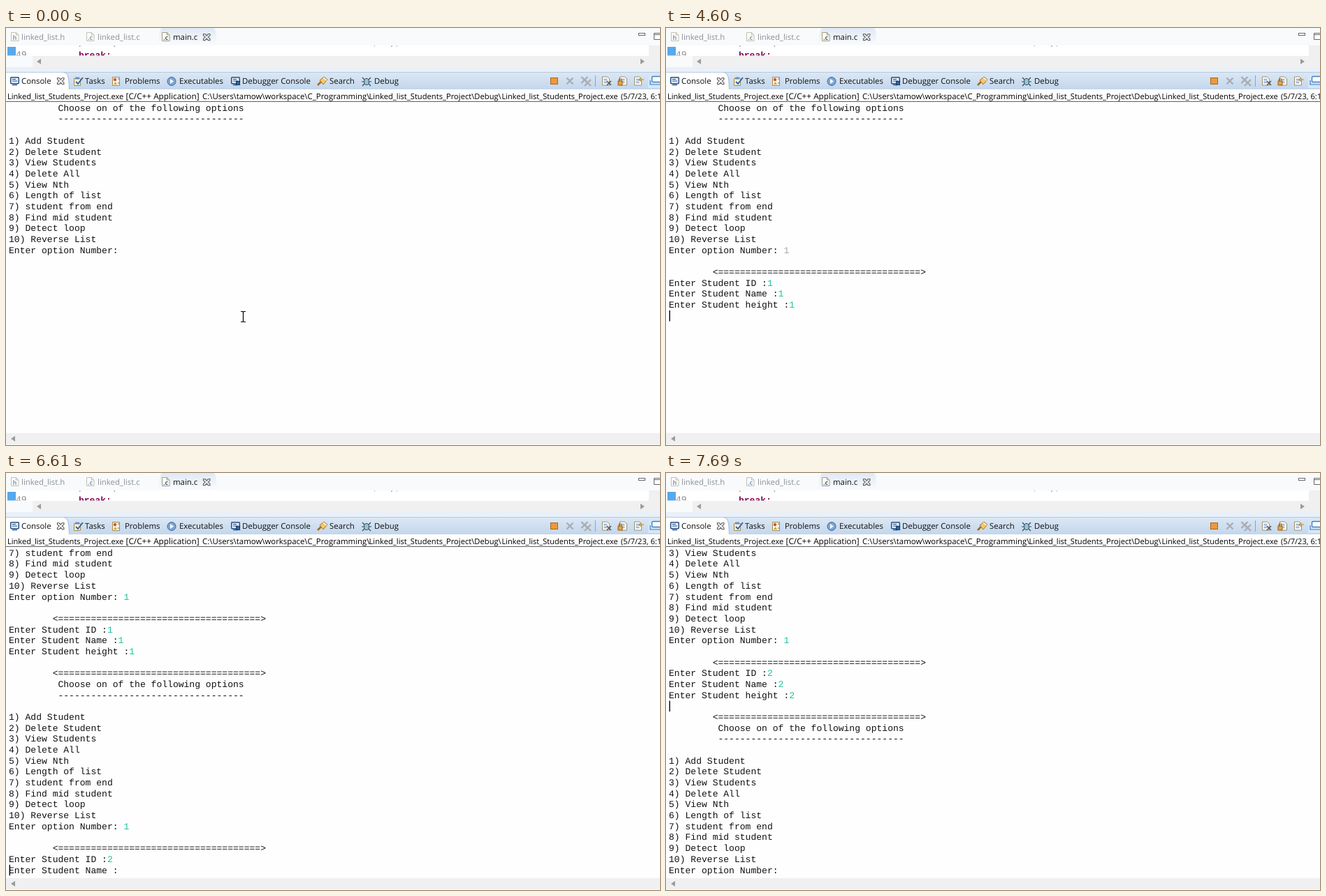
Write an HTML page that moves like this. It is 936 px wide and 598 px high and loops after 8000 ms.

```html
<!DOCTYPE html>
<html lang="en">
<head>
<meta charset="utf-8">
<title>Linked list console</title>
<style>
html, body { margin: 0; width: 100%; height: 100%; overflow: hidden; background: #fff; }
svg { display: block; width: 100vw; height: 100vh; }
text { white-space: pre; text-rendering: geometricPrecision; }
.ui { font: 11.4px "Open Sans", "Noto Sans", sans-serif; fill: #111; }
.dim { fill: #8d9196; }
.path { fill: #000; }
.mono { font: 13.05px "Liberation Mono", "Courier New", monospace; fill: #111; }
.code { font: bold 13px "Liberation Mono", monospace; }
.glyph { font: bold 9px "Open Sans", sans-serif; fill: #2c5f9e; }
.line { fill: none; stroke-width: 1.2; }
</style>
</head>
<body>
<svg viewBox="0 0 936 598" preserveAspectRatio="none">
  <defs>
    <linearGradient id="strip" x2="0" y2="1">
      <stop offset="0" stop-color="#dce8f5"/><stop offset="1" stop-color="#c2d6eb"/>
    </linearGradient>
    <linearGradient id="tab" x2="0" y2="1">
      <stop offset="0" stop-color="#dfe9f5"/><stop offset="1" stop-color="#fbfcfe"/>
    </linearGradient>
    <clipPath id="editor"><path d="M0 25.5H920V39.5H0z"/></clipPath>
    <clipPath id="view"><path d="M0 106H936V581H0z"/></clipPath>
    <g id="page">
      <path d="M.5.5h7l3.500 3.500v8.500H.5z" fill="#fdfdfb" stroke="#a79b78"/>
      <path d="M7.500.5v3.500h3.500" class="line" stroke="#a79b78"/>
    </g>
    <path id="close" class="line" d="M.5.5h2.500l2.200 2.500 2.200-2.500h2.500v2.200l-2.600 2.400 2.600 2.400v2.200h-2.500l-2.200-2.500-2.200 2.500H.5V7.500l2.600-2.400L.5 2.700z" stroke="#666"/>
    <path id="cross" class="line" d="M0 0l9 9M9 0L0 9" stroke="#a9adb2" style="stroke-width:2.4"/>
    <g id="sheet">
      <path d="M.5.5h7l3 3v9H.5z" fill="#fff" stroke="#9a8f68"/>
      <path d="M2.500 4h5M2.500 6.500h5M2.500 9h5" class="line" stroke="#5b80b5"/>
    </g>
    <g id="screen">
      <rect x=".7" y=".7" width="11.600" height="9" rx="1" fill="#e6f0fb" stroke="#264f86" stroke-width="1.500"/>
      <path d="M3 3.500h5M3 6h7M3 11.700h7" class="line" stroke="#264f86"/>
    </g>
  </defs>

  <!-- editor -->
  <rect width="936" height="64" fill="#f8fafc"/>
  <path d="M217 25.500C219 25 219 0 224 0H296C300 0 301 4 301 25.500z" fill="url(#tab)"/>
  <g opacity=".6">
    <use href="#page" x="7" y="6"/><text class="glyph" x="9.500" y="17">h</text>
    <use href="#page" x="115" y="6"/><text class="glyph" x="117" y="17">.c</text>
  </g>
  <use href="#page" x="223" y="6"/><text class="glyph" x="225" y="17">.c</text>
  <g class="ui">
    <text class="dim" x="22" y="17">linked_list.h</text>
    <text class="dim" x="131" y="17">linked_list.c</text>
    <text x="239" y="17">main.c</text>
  </g>
  <use href="#close" x="282" y="8"/>
  <g fill="#fff" stroke="#666">
    <rect x="905.500" y="7.500" width="9" height="3"/>
    <path d="M940 7.500H927.500V16.500H940M927.500 9.500H940"/>
  </g>
  <rect y="25" width="920" height="15" fill="#fff"/>
  <rect x="920" y="25" width="16" height="31" fill="#f0f0f0"/>
  <g clip-path="url(#editor)">
    <rect x="2" y="27" width="12" height="13" fill="#58a8ea"/>
    <text class="code" x="14" y="42" style="font-weight:400;fill:#8a8a8a">49</text>
    <text class="code" x="104" y="43" fill="#7f0055">break;</text>
    <text class="code" x="104" y="24" style="font-weight:400;fill:#555">p     (                                               ,  );</text>
  </g>
  <rect x="38" y="40" width="882" height="16" fill="#f0f0f0"/>
  <path d="M50 44v8l-6-4zM908 44v8l6-4z" fill="#9b9b9b"/>

  <!-- view tabs -->
  <rect y="56" width="936" height="7" fill="#e9f0f8"/>
  <rect y="63" width="936" height="26" fill="url(#strip)"/>
  <path d="M0 63.500H936" stroke="#b8c9dc"/>
  <path d="M0 89V64H82C88 64 90 68 90 89z" fill="#fff"/>
  <path d="M82 63.500C88 64 90.500 68 90.500 89" class="line" stroke="#b0c3d8"/>
  <rect y="88" width="936" height="510" fill="#fefefe"/>
  <use href="#screen" x="6" y="70"/>
  <use href="#close" x="73" y="71"/>
  <g id="tabs" class="ui"></g>
  <g>
    <path d="M97.500 72.500h9v10h-9z" fill="#f8f1d8" stroke="#a68a4a"/>
    <path d="M100 77l3 3 7-9" class="line" stroke="#3465a8" style="stroke-width:2"/>
    <path d="M99 70.500h6v3h-6z" fill="#6d8fc0"/>
    <path d="M152.500 70.500h10v12h-10z" fill="#fbf5e2" stroke="#a68a4a"/>
    <circle cx="156" cy="74" r="2.200" fill="#d1503c"/><path d="M154 81l2.500-4 2.500 4z" fill="#e0a020"/>
    <path d="M160 73h2M160 79h2" class="line" stroke="#3465a8"/>
    <circle cx="237" cy="76.500" r="6" fill="#7fa6d6" stroke="#3b659c"/>
    <path d="M235 73l5 3.500-5 3.500z" fill="#fff"/>
    <use href="#screen" x="322" y="70"/>
    <path d="M329 76l6 6M329 82l6-6" class="line" stroke="#16325c"/><circle cx="332" cy="79" r="2.600" fill="#2f6db0" stroke="#16325c"/>
    <path d="M446 82l5-5" class="line" stroke="#a56a1e" style="stroke-width:2.500"/>
    <path d="M449 75l6-5 5 4-6 7z" fill="#f5c66c" stroke="#a3732c"/>
    <path d="M454 71l5 4" class="line" stroke="#fff"/>
    <path d="M510 71l3 3M522 71l-3 3M509 77h14M510 83l3-3M522 83l-3-3" class="line" stroke="#2d4a5e"/>
    <ellipse cx="516" cy="77" rx="3.400" ry="4.600" fill="#9cc3cf" stroke="#2d4a5e"/>
  </g>
  <g>
    <rect x="779.500" y="71.500" width="10" height="9" fill="#ee9a3a" stroke="#a8641c"/>
    <use href="#cross" x="802.500" y="71.500"/>
    <use href="#cross" x="823.500" y="70"/><use href="#cross" x="828" y="74"/>
    <path d="M843.500 68V84" stroke="#8ea2b8"/>
    <use href="#sheet" x="853" y="69.500"/>
    <path d="M860 76l6 6M866 76l-6 6" class="line" stroke="#555" style="stroke-width:1.600"/>
    <use href="#sheet" x="878" y="69.500"/>
    <rect x="876" y="76" width="6" height="6" fill="#e8a33a" stroke="#94631c"/>
    <path d="M877.500 76v-3h3v3" class="line" stroke="#94631c"/>
    <use href="#sheet" x="899" y="69.500"/>
    <path d="M913 74h-6M909 71.500L906 74l3 2.500" class="line" stroke="#c08a24"/>
    <rect x="919" y="67" width="17" height="19" fill="#d5e7f9"/>
    <rect x="924.500" y="69.500" width="16" height="8" rx="1.500" fill="#fff" stroke="#3f7fc4" stroke-width="1.400"/>
    <path d="M922 75v6h14" class="line" stroke="#3f7fc4"/>
  </g>
  <g id="label" class="ui path"></g>
  <path d="M0 105.500H936" stroke="#606060"/>

  <g clip-path="url(#view)">
    <g id="roll">
      <g id="rows" class="mono"></g>
      <rect id="caret" width="1.400" height="15.500" fill="#000"/>
    </g>
  </g>
  <rect y="581" width="936" height="16" fill="#f0f0f0"/>
  <path d="M13 585v8l-6-4z" fill="#9b9b9b"/>

  <path id="beam" class="line" d="M-3.500-7.500h2.500l1 1 1-1h2.500M0-6.500v13M-3.500 7.500h2.500l1-1 1 1h2.500" stroke="#000"/>
  <path id="arrow" d="M.5.5v15l3.500-3.300 2.400 5.500 2.200-1-2.400-5.300h4.800z" fill="#fff" stroke="#000"/>
</svg>
<script>
const $ = id => document.getElementById(id);
const LOOP = 8000, X0 = 4, CHAR = 7.83, BASE = 118.8, ROW = 15.68, ROWS = 30;

function label(parent, str, x, y, style) {
  const el = document.createElementNS('http://www.w3.org/2000/svg', 'text');
  el.setAttribute('x', x);
  el.setAttribute('y', y);
  if (style) el.setAttribute('style', style);
  el.textContent = str;
  return $(parent).appendChild(el);
}

[['Console', 22], ['Tasks', 113], ['Problems', 170], ['Executables', 248],
 ['Debugger Console', 338], ['Search', 463], ['Debug', 527]]
  .forEach(([s, x]) => label('tabs', s, x, 80));

const project = 'Linked_list_Students_Project';
[[project + '.exe', 2, 11.1], ['[C/C++ Application]', 171.5, 11.8],
 ['C:\\Users\\tamow\\workspace\\C_Programming\\', 281, 11.4],
 [project + '\\Debug\\', 519.5, 11.2], [project + '.exe', 709.5, 11.1], ['(5/7/23, 6:15 PM)', 880, 11.1]]
  .forEach(([s, x, size]) => label('label', s, x, 102, `font-size:${size}px`));

// console contents
const pad = ' '.repeat(9);
const items = ['Add Student', 'Delete Student', 'View Students', 'Delete All', 'View Nth',
  'Length of list', 'student from end', 'Find mid student', 'Detect loop', 'Reverse List'];
const menu = [pad + 'Choose on of the following options', pad + '-'.repeat(34), '',
  ...items.map((s, i) => `${i + 1}) ${s}`), 'Enter option Number: '];
const bar = ['', pad.slice(1) + '<' + '='.repeat(37) + '>'];
const form = ['ID', 'Name', 'height'].map(s => `Enter Student ${s} :`);
const lines = [...menu, ...bar, ...form, ...bar, ...menu, ...bar, ...form, ...bar, ...menu];
const rows = lines.map((s, i) => label('rows', s, X0, BASE + i * ROW));
const answers = [];

// session: what happens when
const session = [
  [1310, 'focus'], [1860, 'type', 1], [2110, 'enter'], [2110, 'print', 3], [2640, 'blink'],
  [3120, 'type', 1], [3420, 'enter'], [3420, 'print', 1],
  [3670, 'type', 1], [3970, 'enter'], [3970, 'print', 1],
  [4140, 'type', 1], [4600, 'enter'], [4670, 'print', 16],
  [5220, 'type', 1], [5680, 'enter'], [5750, 'print', 3],
  [6310, 'type', 2], [6540, 'enter'], [6610, 'print', 1],
  [6760, 'type', 2], [7090, 'enter'], [7160, 'print', 1],
  [7230, 'type', 2], [7550, 'enter'], [7620, 'print', 2], [7690, 'print', 14]
];

const actions = {
  focus: s => ({ caret: [s.count - 1, lines[s.count - 1].length] }),
  blink: () => ({ caret: null }),
  type(s, value) {
    const row = s.count - 1, col = lines[row].length;
    answers.push(label('rows', value, X0 + col * CHAR, BASE + row * ROW, 'fill:#1cc2a0'));
    return { typed: s.typed + 1, caret: [row, col + 1] };
  },
  enter: s => ({ caret: [s.count, 0], top: Math.max(s.top, s.count - ROWS + 0.81) }),
  print: (s, n) => ({ count: s.count + n, top: Math.max(0, s.count + n - ROWS) })
};

const states = [{ time: 0, count: menu.length, typed: 0, top: 0, caret: null }];
for (const [time, act, arg] of session) {
  const last = states[states.length - 1];
  states.push({ ...last, time, ...actions[act](last, arg) });
}

const show = (el, on) => el.setAttribute('visibility', on ? 'visible' : 'hidden');
const move = (el, x, y) => el.setAttribute('transform', `translate(${x} ${y})`);

function drawConsole(t) {
  const s = states.filter(v => v.time <= t).pop();
  rows.forEach((el, i) => show(el, i < s.count));
  answers.forEach((el, i) => show(el, i < s.typed));
  answers[0].style.fill = s.top ? '#1cc2a0' : '#a3aaa6';
  move($('roll'), 0, -s.top * ROW);
  show($('caret'), s.caret);
  if (s.caret) move($('caret'), X0 + 0.6 + s.caret[1] * CHAR, BASE - 11.7 + s.caret[0] * ROW);
}

// pointer legs: first step, last step, number of steps, from, to
const legs = [
  [70, 460, 7, [339.5, 414], [190.5, 330]],
  [610, 767, 3, [190.5, 330], [23, 72]],
  [845, 1080, 4, [23, 72], [266.5, 376]]
];

function drawPointer(t) {
  let [x, y] = legs[0][3];
  for (const [start, end, n, a, b] of legs) {
    if (t < start) break;
    const step = Math.min(n, Math.floor((t - start) / (end - start) * (n - 1) + 1e-6) + 1);
    const p = step / n, e = p * p * (3 - 2 * p);
    x = a[0] + (b[0] - a[0]) * e;
    y = a[1] + (b[1] - a[1]) * e;
  }
  const seen = t < 1860, onText = y > 106;
  show($('beam'), seen && onText);
  show($('arrow'), seen && !onText);
  move($('beam'), x, y);
  move($('arrow'), x, y);
}

const begin = performance.now();
function frame() {
  const t = (performance.now() - begin) % LOOP;
  drawConsole(t);
  drawPointer(t);
  requestAnimationFrame(frame);
}
frame();
</script>
</body>
</html>
```
